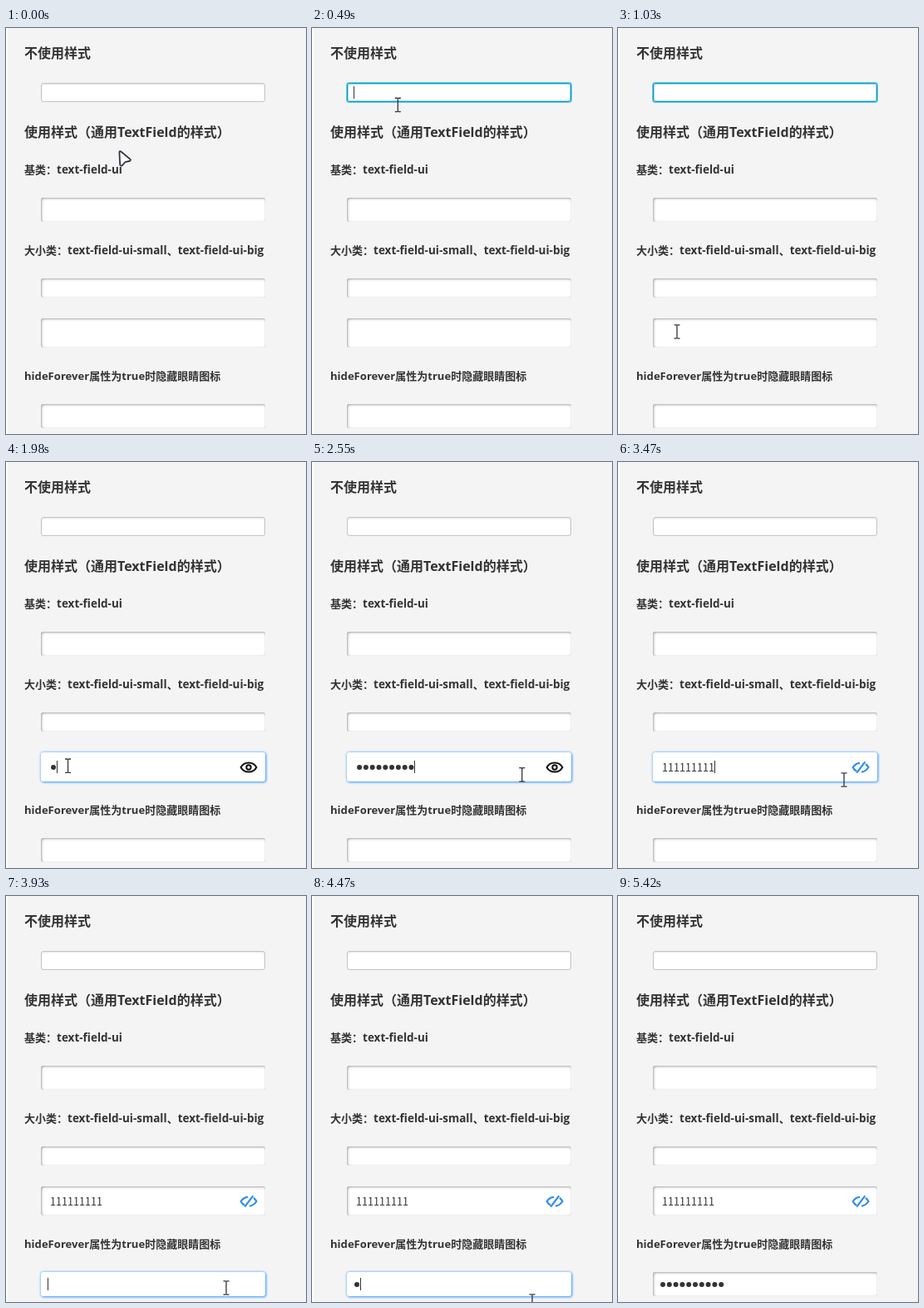
Write an HTML page that moves like this. It is 361 by 488 pixels and loops after 5.46 s.

```html
<!DOCTYPE html>
<html lang="zh-CN">
<head>
<meta charset="utf-8">
<title>Password fields</title>
<style>
  html, body { margin: 0; width: 100%; height: 100%; overflow: hidden; background: #f4f4f4; }
  body { position: relative; box-shadow: inset 2px 0 #fff; }
  svg { position: absolute; left: 0; top: 0; }
  text { fill: #333; font-family: "Open Sans", "Noto Sans CJK SC", "Noto Sans CJK", sans-serif; }
  .heading { font-weight: 700; }
  .value { font: 12.6px "Noto Sans CJK SC", "Noto Sans CJK", sans-serif; }
  .field {
    position: absolute; left: 42px; width: 270px; box-sizing: border-box;
    border-radius: 3px; background: #fff;
    box-shadow: inset 1px 1px 3px rgba(0, 0, 0, .36), inset 0 0 1px rgba(0, 0, 0, .15);
  }
  .field.focus { box-shadow: 0 0 3px #58a6ff, 1px 1px 3px #409eff; }
  .field.plain { border: 1px solid #c4c4c4; box-shadow: inset 0 1px 2px #e2e2e2; }
  .field.plain.focus { border-color: #039ed3; box-shadow: 0 0 0 1px rgba(3, 158, 211, .55), inset 0 0 0 1px rgba(3, 158, 211, .4); }
</style>
</head>
<body>
<svg width="361" height="488" viewBox="0 0 361 488">
  <g id="labels"></g>
  <g id="dots" fill="#333"></g>
  <text id="value" class="value" x="53" y="371.5">111111111</text>
  <path id="caret" stroke="#333" fill="none"/>
  <g id="eye" fill="none" stroke="#111" stroke-width="2">
    <path d="M282.6 367C286.5 359.6 297.5 359.6 301.4 367C297.5 374.4 286.5 374.4 282.6 367Z"/>
    <circle cx="292" cy="367" r="2.7"/>
  </g>
  <path id="eyeOff" fill="none" stroke="#2d8cf0" stroke-width="2.2"
    d="M291 361.8Q286 362 282.6 367Q284.3 370.2 287 371.6M298 362.8Q300 364.3 301.4 367Q298 372.2 293 372.6M297.3 360.3L287.2 373.6"/>
  <path id="arrow" d="M1.4 2Q2 .5 4 2L14.5 10.8Q15.6 12.6 13.5 13L8.6 14L5 18Q3 19.5 2.2 17Z" fill="#fff" stroke="#303540" stroke-width="1.8"/>
  <path id="beam" d="M-3.5 -8.2H-1L0 -7.5L1 -8.2H3.5M0 -7.5V7.5M-3.5 8.2H-1L0 7.5L1 8.2H3.5" fill="none" stroke="#333" stroke-width="1.3"/>
</svg>
<script>
const LOOP = 5460;
const STEP = 48;      // screen refresh while the pointer moves
const REPEAT = 31;    // keyboard auto-repeat
const HOLD = 490;     // delay before auto-repeat, also the caret blink
const PITCH = 7.8;    // width of one bullet

const at = { focusPlain: 450, focusBig: 1230, typeBig: 1530, reveal: 3110, focusLast: 3930, typeLast: 4180, blur: 5420 };

// Pointer moves: start, end, destination
const moves = [
  [50, 290, 104, 87],
  [450, 980, 71, 365],
  [1980, 2510, 252, 376],
  [2550, 3110, 295, 368],
  [3470, 3470, 272, 382],
  [3500, 3770, 265, 471],
  [4180, 4470, 265, 487],
  [4670, 5060, 266, 505]
];

const $ = id => document.getElementById(id);
const svgNode = name => document.createElementNS('http://www.w3.org/2000/svg', name);
const show = (node, on) => node.setAttribute('visibility', on ? 'visible' : 'hidden');
const place = (node, x, y) => node.setAttribute('transform', `translate(${x} ${y})`);

// Latin runs may be set a little larger than the Chinese around them.
function label(y, size, latinSize, string) {
  const text = svgNode('text');
  text.setAttribute('class', 'heading');
  text.setAttribute('x', 22);
  text.setAttribute('y', y);
  for (const run of string.match(/[a-z-]+|[^a-z-]+/gi)) {
    const span = svgNode('tspan');
    span.textContent = run;
    span.setAttribute('font-size', /[a-z]/i.test(run) ? latinSize : size);
    text.append(span);
  }
  $('labels').append(text);
}
label(36, 16, 16, '不使用样式');
label(131, 16, 16, '使用样式（通用TextField的样式）');
label(175, 13, 13.5, '基类：text-field-ui');
label(272, 13, 13.5, '大小类：text-field-ui-small、text-field-ui-big');
label(423, 13, 13.1, 'hideForever属性为true时隐藏眼睛图标');

function makeField(top, height, kind = '') {
  const node = document.createElement('div');
  node.className = `field ${kind}`;
  node.style.top = `${top}px`;
  node.style.height = `${height}px`;
  $('labels').ownerSVGElement.before(node);
  return { node, top, bottom: top + height };
}
const plain = makeField(66, 23, 'plain');
const base = makeField(204, 29);
const small = makeField(301, 23);
const big = makeField(349, 35);
const last = makeField(452, 29);
const fields = [plain, base, small, big, last];

function dotRow(left, y, count) {
  return Array.from({ length: count }, (_, i) => {
    const dot = svgNode('circle');
    dot.setAttribute('cx', left + (i + .46) * PITCH);
    dot.setAttribute('cy', y);
    dot.setAttribute('r', 3);
    $('dots').append(dot);
    return dot;
  });
}
const bigDots = dotRow(53.5, 367, 9);
const lastDots = dotRow(50.4, 467, 10);

function pointerAt(t) {
  let [x, y] = [135, 147];
  for (const [start, end, toX, toY] of moves) {
    if (t < start) break;
    const steps = Math.round((end - start) / STEP) + 1;
    const k = Math.min(1, (Math.floor((t - start) / STEP) + 1) / steps);
    const ease = k * k * (3 - 2 * k);
    x += (toX - x) * ease;
    y += (toY - y) * ease;
  }
  return [x, y];
}

// A held key: one press, then auto-repeat after the delay.
function typed(t, press, max) {
  if (t < press) return 0;
  const repeats = Math.floor((t - press - HOLD) / REPEAT) + 1;
  return Math.min(max, 1 + Math.max(0, repeats));
}

function focusAt(t) {
  if (t < at.focusPlain || t >= at.blur) return null;
  return t < at.focusBig ? plain : t < at.focusLast ? big : last;
}

function caretAt(t, focus, bigCount, lastCount) {
  if (focus === plain && t < at.focusPlain + HOLD) return [50, 70];
  if (focus === last) return [50.4 + lastCount * PITCH, 459];
  if (focus !== big) return null;
  if (t < at.reveal) return t < 2760 && [53.5 + bigCount * PITCH, 359];
  return t >= 3470 && [116, 359];
}

function render(t) {
  const focus = focusAt(t);
  const masked = t < at.reveal;
  const bigCount = typed(t, at.typeBig, 9);
  const lastCount = typed(t, at.typeLast, 10);

  fields.forEach(field => field.node.classList.toggle('focus', field === focus));
  bigDots.forEach((dot, i) => show(dot, masked && i < bigCount));
  lastDots.forEach((dot, i) => show(dot, i < lastCount));
  show($('value'), !masked);
  show($('eye'), masked && bigCount > 0);
  show($('eyeOff'), !masked);

  const caret = caretAt(t, focus, bigCount, lastCount);
  show($('caret'), caret);
  if (caret) $('caret').setAttribute('d', `M${Math.floor(caret[0]) + .5} ${caret[1]}v15`);

  const [x, y] = pointerAt(t);
  const overField = fields.some(f => y >= f.top - 1 && y <= f.bottom + 6);
  show($('beam'), overField);
  show($('arrow'), !overField);
  place($('beam'), x, y);
  place($('arrow'), x, y);
}

const start = performance.now();
function tick() {
  render((performance.now() - start) % LOOP);
  requestAnimationFrame(tick);
}
tick();
</script>
</body>
</html>
```
